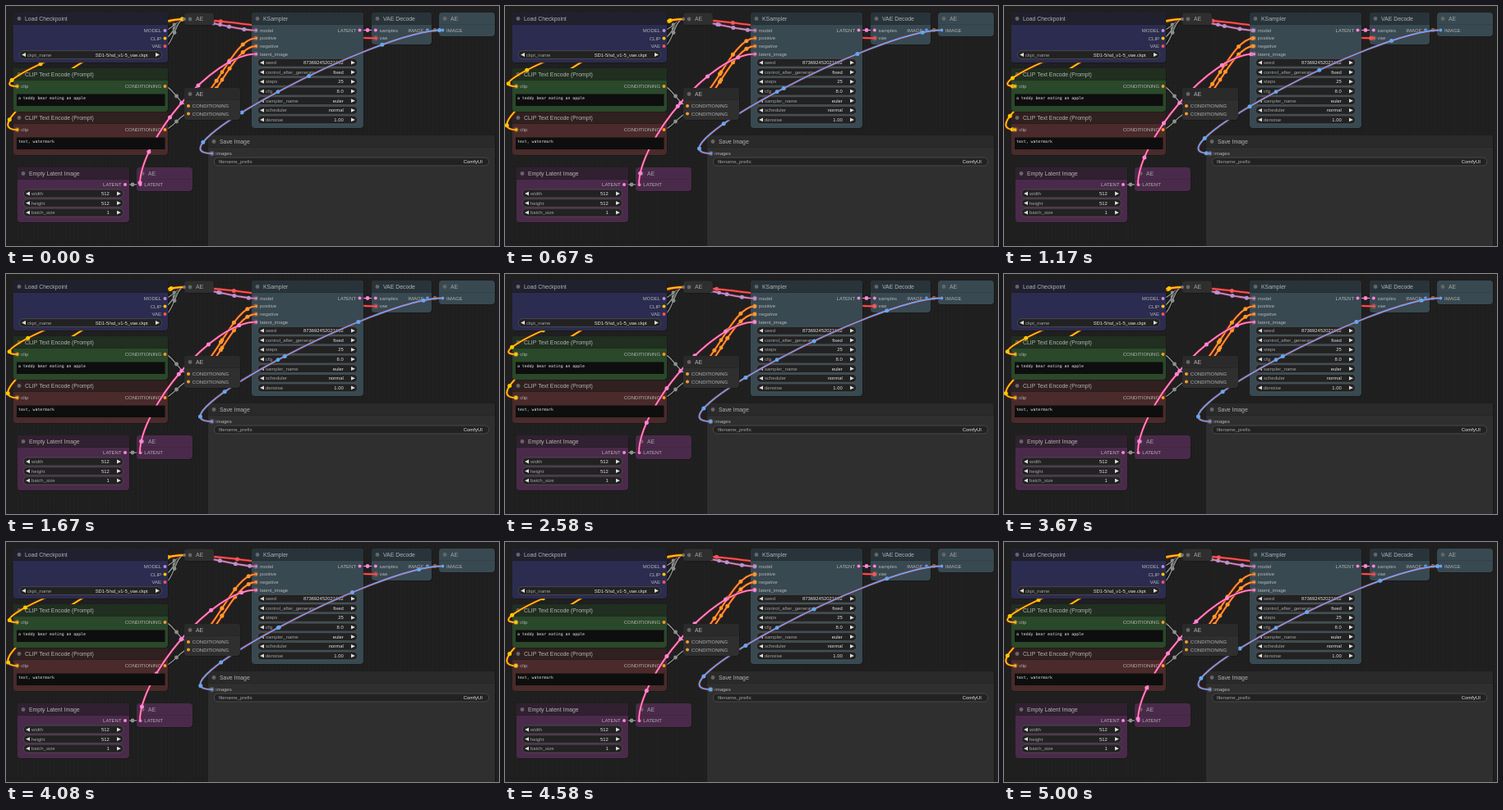
Animation, 600 px wide and 293 px high, one loop 5080 ms. Source, as an HTML page with a canvas:

```html
<!DOCTYPE html>
<html lang="en">
<head>
<meta charset="utf-8">
<title>Node graph</title>
<style>
html, body { margin: 0; width: 100%; height: 100%; overflow: hidden; background: #202020; }
canvas { display: block; }
</style>
</head>
<body>
<canvas id="stage" width="600" height="293"></canvas>
<script>
const ctx = document.getElementById('stage').getContext('2d');
const W = 600, H = 293, LOOP = 5080, TICK = 1000 / 12, PHASE = 14;
const SANS = '"Liberation Sans", Arial, sans-serif';
const MONO = '"DejaVu Sans Mono", monospace';
const TYPE = {
  model: '#b892d4', clip: '#ffc800', vae: '#ff5555', cond: '#ff9a2a',
  latent: '#ff86d8', image: '#64a8f0', grey: '#8d918d'
};
const THEME = {
  blue: ['#20202f', '#2c2c50'], green: ['#202f20', '#2a482a'], red: ['#302020', '#4a2a2a'],
  purple: ['#302030', '#4a2a4a'], teal: ['#28343a', '#384951'], grey: ['#2a2a2a', '#2f2f2f']
};

function text(str, x, y, color = '#b4b4b4', size = 6, align = 'left', family = SANS) {
  ctx.font = `${size}px ${family}`;
  ctx.fillStyle = color;
  ctx.textAlign = align;
  ctx.textBaseline = 'middle';
  ctx.fillText(str, x, y + 0.4);
}

function dot(x, y, r, color) {
  ctx.fillStyle = color;
  ctx.beginPath();
  ctx.arc(x, y, r, 0, Math.PI * 2);
  ctx.fill();
}

function box(x, y, w, h, r, fill) {
  ctx.fillStyle = fill;
  ctx.beginPath();
  ctx.roundRect(x, y, w, h, r);
  ctx.fill();
}

function triangle(x, y, dx) {
  ctx.fillStyle = '#ddd';
  ctx.beginPath();
  ctx.moveTo(x, y - 2.4);
  ctx.lineTo(x + dx, y);
  ctx.lineTo(x, y + 2.4);
  ctx.fill();
}

// A flat node has no darker title bar.
function node(title, theme, x, y, w, h, flat) {
  const [head, body] = THEME[theme];
  box(x + 0.7, y + 0.7, w, h, 4, 'rgba(0,0,0,.3)');
  box(x, y, w, h, 4, body);
  if (!flat) box(x, y, w, 15, [4, 4, 0, 0], head);
  if (h > 15) {
    ctx.fillStyle = 'rgba(0,0,0,.2)';
    ctx.fillRect(x, y + 14.5, w, 0.5);
  }
  dot(x + 7, y + 7.5, 2.4, '#666');
  text(title, x + 14, y + 7.5, flat ? '#a0a0a0' : '#b2b2b2', 6.9);
}

function input(label, type, x, y) {
  dot(x, y, 2, TYPE[type]);
  text(label, x + 4.8, y);
}

function output(label, type, x, y) {
  dot(x, y, 2, TYPE[type]);
  text(label, x - 4.4, y, '#b4b4b4', 6, 'right');
}

function field(x, y, w) {
  box(x + 7.3, y - 4.9, w - 14.6, 9.8, 4.9, '#222');
  ctx.strokeStyle = '#666';
  ctx.lineWidth = 0.5;
  ctx.stroke();
}

function widget(name, value, x, y, w) {
  field(x, y, w);
  triangle(x + 15, y, -4.9);
  triangle(x + w - 15, y, 4.9);
  text(name, x + 17, y, '#a2a2a2');
  text(value, x + w - 24.3, y, '#e4e4e4', 5.85, 'right');
}

function prompt(str, y) {
  ctx.fillStyle = '#0e0e0e';
  ctx.fillRect(13, y, 180.5, 14.5);
  text(str, 15, y + 4.6, '#e4e4e4', 4.86, 'left', MONO);
}

// Cubic link whose handles are a quarter of its length.
function link(type, x0, y0, x1, y1, dx0 = 1, dy0 = 0) {
  const d = Math.hypot(x1 - x0, y1 - y0) / 4;
  return { color: TYPE[type], p: [[x0, y0], [x0 + dx0 * d, y0 + dy0 * d], [x1 - d, y1], [x1, y1]] };
}

function pointOn({ p }, t) {
  const u = 1 - t, k = [u * u * u, 3 * u * u * t, 3 * u * t * t, t * t * t];
  return [0, 1].map(axis => k.reduce((sum, c, i) => sum + c * p[i][axis], 0));
}

function strokeLink({ p }, color, width) {
  ctx.strokeStyle = color;
  ctx.lineWidth = width;
  ctx.beginPath();
  ctx.moveTo(...p[0]);
  ctx.bezierCurveTo(...p[1], ...p[2], ...p[3]);
  ctx.stroke();
}

function plainLink(l, mid = l.color) {
  strokeLink(l, 'rgba(0,0,0,.5)', 3.2);
  strokeLink(l, l.color, 1.4);
  dot(...pointOn(l, 0.5), 2.4, mid);
}

// Glowing link with a fixed middle marker and five travelling dots.
function flowLink(l, time) {
  strokeLink(l, 'rgba(170,25,30,.65)', 3.3);
  strokeLink(l, l.color, 1.8);
  dot(...pointOn(l, 0.5), 2.4, l.color);
  for (let i = 0; i < 5; i++) {
    dot(...pointOn(l, ((time + PHASE) / 1000 + i * 0.2) % 1), 2.5, l.color);
  }
  ctx.strokeStyle = 'rgba(140,110,110,.7)';
  ctx.lineWidth = 0.8;
  ctx.beginPath();
  ctx.arc(...l.p[3], 2.8, 0, Math.PI * 2);
  ctx.stroke();
}

const wires = [
  link('grey', 193, 30, 217, 16), link('grey', 193, 39.5, 217, 16), link('grey', 193, 49, 217, 16),
  link('grey', 193, 98, 222, 122), link('grey', 193, 151, 222, 131),
  link('grey', 145, 218, 163, 218), link('latent', 430, 29.5, 450, 29.5)
];
const imageWire = link('grey', 513, 29.5, 531, 29.5);
const flows = {
  clipTop: [link('clip', 217, 16, 13.5, 98, -1)],
  clipLow: [link('clip', 217, 16, 13.5, 151, -1)],
  decode: [link('vae', 217, 16, 450, 39.3)],
  sampler: [
    link('model', 217, 16, 304, 29.7),
    link('cond', 222, 122, 304, 39.4), link('cond', 222, 131, 304, 49),
    link('latent', 163, 218, 304, 58.6, 0, -1)
  ],
  save: [link('image', 531, 29.5, 250.5, 180, -1)]
};

function background() {
  ctx.fillStyle = '#202020';
  ctx.fillRect(0, 0, W, H);
  ctx.fillStyle = 'rgba(0,0,0,.08)';
  for (let x = 2; x < W; x += 4.86) ctx.fillRect(x, 0, 0.6, H);
  for (let y = 1; y < H; y += 4.86) ctx.fillRect(0, y, W, 0.6);
}

function encoder(theme, y) {
  node('CLIP Text Encode (Prompt)', theme, 9, y, 188, 53);
  input('clip', 'clip', 13.5, y + 22);
  output('CONDITIONING', 'cond', 193.5, y + 22);
}

function checkpoint() {
  node('Load Checkpoint', 'blue', 9, 8, 188, 61);
  output('MODEL', 'model', 193.5, 30);
  output('CLIP', 'clip', 193.5, 39.5);
  output('VAE', 'vae', 193.5, 49);
  widget('ckpt_name', 'SD1-5/sd_v1-5_vae.ckpt', 9, 59.5, 188);
}

function latentImage() {
  node('Empty Latent Image', 'purple', 14, 197, 136, 67);
  output('LATENT', 'latent', 145, 218);
  [['width', '512'], ['height', '512'], ['batch_size', '1']].forEach(([name, value], i) =>
    widget(name, value, 14, 229 + i * 11.6, 136));
  node('AE', 'purple', 159, 197, 68, 29, true);
  input('LATENT', 'latent', 163.5, 218);
}

function decoder() {
  node('VAE Decode', 'teal', 445, 8, 73, 39);
  input('samples', 'latent', 449.8, 29.5);
  input('vae', 'vae', 449.8, 39.3);
  output('IMAGE', 'image', 513, 29.5);
  node('AE', 'teal', 527, 8, 68, 29, true);
  input('IMAGE', 'image', 531.3, 29.5);
}

function sampler() {
  node('KSampler', 'teal', 299, 8, 136, 141);
  [['model', 'model'], ['positive', 'cond'], ['negative', 'cond'], ['latent_image', 'latent']]
    .forEach(([label, type], i) => input(label, type, 304, 29.7 + i * 9.65));
  output('LATENT', 'latent', 430.5, 29.5);
  [['seed', '873692452021652'], ['control_after_generate', 'fixed'], ['steps', '25'], ['cfg', '8.0'],
    ['sampler_name', 'euler'], ['scheduler', 'normal'], ['denoise', '1.00']]
    .forEach(([name, value], i) => widget(name, value, 299, 69.2 + i * 11.62, 136));
}

function saver() {
  node('Save Image', 'grey', 246, 158, 349, 140);
  input('images', 'image', 250.5, 180);
  field(246, 190, 349);
  text('filename_prefix', 259, 190, '#a2a2a2');
  text('ComfyUI', 580, 190, '#e4e4e4', 6, 'right');
}

function hubs() {
  node('AE', 'grey', 217, 8.5, 36, 14.5, true);
  dot(217, 16, 1.9, '#777');
  node('AE', 'grey', 217, 100, 68, 39);
  input('CONDITIONING', 'cond', 222, 122);
  input('CONDITIONING', 'cond', 222, 131.5);
}

// Flow links lie above the node they enter and below later nodes.
function draw(time) {
  const flow = name => flows[name].forEach(l => flowLink(l, time));
  background();
  wires.forEach(l => plainLink(l));
  plainLink(imageWire, '#a8763e');
  encoder('red', 129);
  flow('clipLow');
  encoder('green', 76);
  flow('clipTop');
  latentImage();
  decoder();
  flow('decode');
  sampler();
  flow('sampler');
  saver();
  flow('save');
  hubs();
  checkpoint();
  prompt('a teddy bear eating an apple', 107.5);
  prompt('text, watermark', 160.5);
}

// The picture holds for twelfths of a second, rounded to hundredths.
function frame() {
  const now = performance.now() % LOOP;
  const step = Math.floor((Math.floor(now / 10) * 10 + 5) / TICK);
  draw(Math.min(step, 60) * TICK);
  requestAnimationFrame(frame);
}
frame();
</script>
</body>
</html>
```
